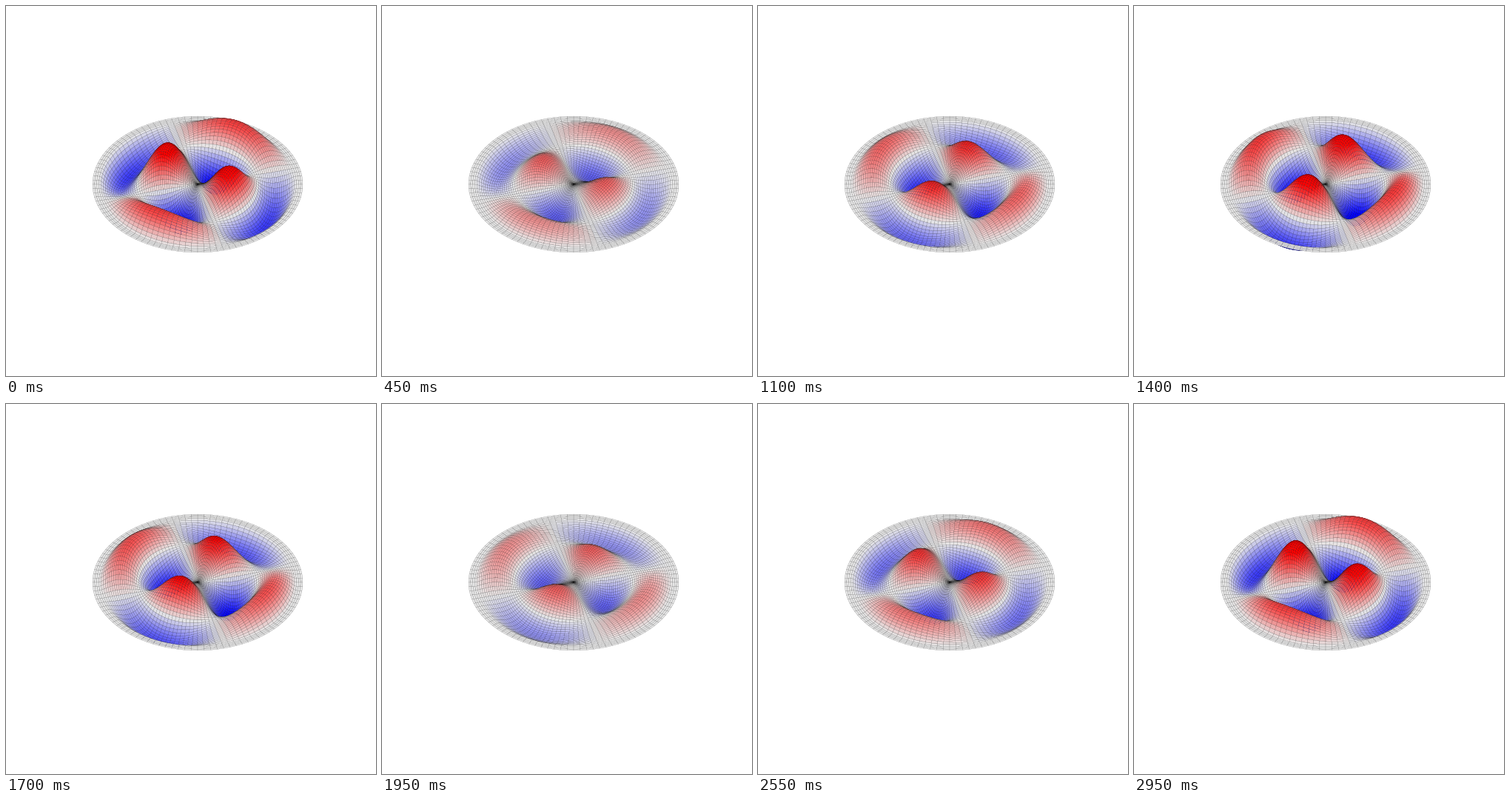
These frames come from a looping animation (500x500 px, 3 s). A matplotlib script:

```python
import numpy as np
import matplotlib.pyplot as plt
from matplotlib.animation import FuncAnimation
from matplotlib.collections import PolyCollection

FRAMES, INTERVAL = 60, 50
RINGS, SPOKES = 50, 100
CX, CY = 259, 241          # centre of the drum on the stage
RX, RY = 142, 92           # half axes of the tilted disc
LIFT = 38                  # height of the tallest peak in pixels
INNER = 0.93               # the membrane ends here, a flat rim follows
ROOT = 8.41724             # second zero of J2
TILT = np.radians(150)     # direction of a crest

GREY = np.array([0.9, 0.9, 0.9])
RED = np.array([1.0, 0.0, 0.0])
BLUE = np.array([0.0, 0.0, 1.0])
FULL = 0.85                # height at which the colour is pure


def bessel2(x):
    tau = (np.arange(200) + 0.5) * np.pi / 200
    return np.cos(2 * tau - x[..., None] * np.sin(tau)).mean(axis=-1)


def mode(r, theta):
    radial = bessel2(ROOT * r / INNER) / 0.4865
    return np.where(r < INNER, radial * np.cos(2 * (theta - TILT)), 0)


def corners(a):
    quads = np.stack([a[:-1, :-1], a[1:, :-1], a[1:, 1:], a[:-1, 1:]], axis=-1)
    return quads.reshape(-1, 4)


r, theta = np.meshgrid(np.linspace(0, 1, RINGS + 1),
                       np.linspace(0, 2 * np.pi, SPOKES + 1), indexing="ij")
x = corners(r * np.cos(theta))
y = corners(r * np.sin(theta))
z = corners(mode(r, theta))

# Far cells first, so that near ones cover them
order = np.argsort(-y.mean(axis=1), kind="stable")
x, y, z = x[order], y[order], z[order]
height = z.mean(axis=1)


def shape(amp):
    return np.stack([CX + RX * x, CY - RY * y - LIFT * amp * z], axis=-1)


def colours(amp):
    v = np.clip(amp * height / FULL, -1, 1)[:, None]
    return GREY + np.abs(v) * (np.where(v > 0, RED, BLUE) - GREY)


fig = plt.figure(figsize=(5, 5), dpi=100, facecolor="white")
ax = fig.add_axes([0, 0, 1, 1])
ax.set_xlim(0, 500)
ax.set_ylim(500, 0)
ax.axis("off")

# The plain layer below closes the antialiased seams of the mesh
fill = PolyCollection(shape(1), edgecolors="none", linewidths=0)
mesh = PolyCollection(shape(1), edgecolors="black", linewidths=0.08)
for layer in (fill, mesh):
    ax.add_collection(layer, autolim=False)


def update(i):
    amp = np.cos(2 * np.pi * (i + 1) / FRAMES)
    verts, faces = shape(amp), colours(amp)
    for layer in (fill, mesh):
        layer.set_verts(verts)
        layer.set_facecolor(faces)
    return fill, mesh


anim = FuncAnimation(fig, update, frames=FRAMES, interval=INTERVAL,
                     repeat=True, repeat_delay=0, blit=False)
plt.show()
```
